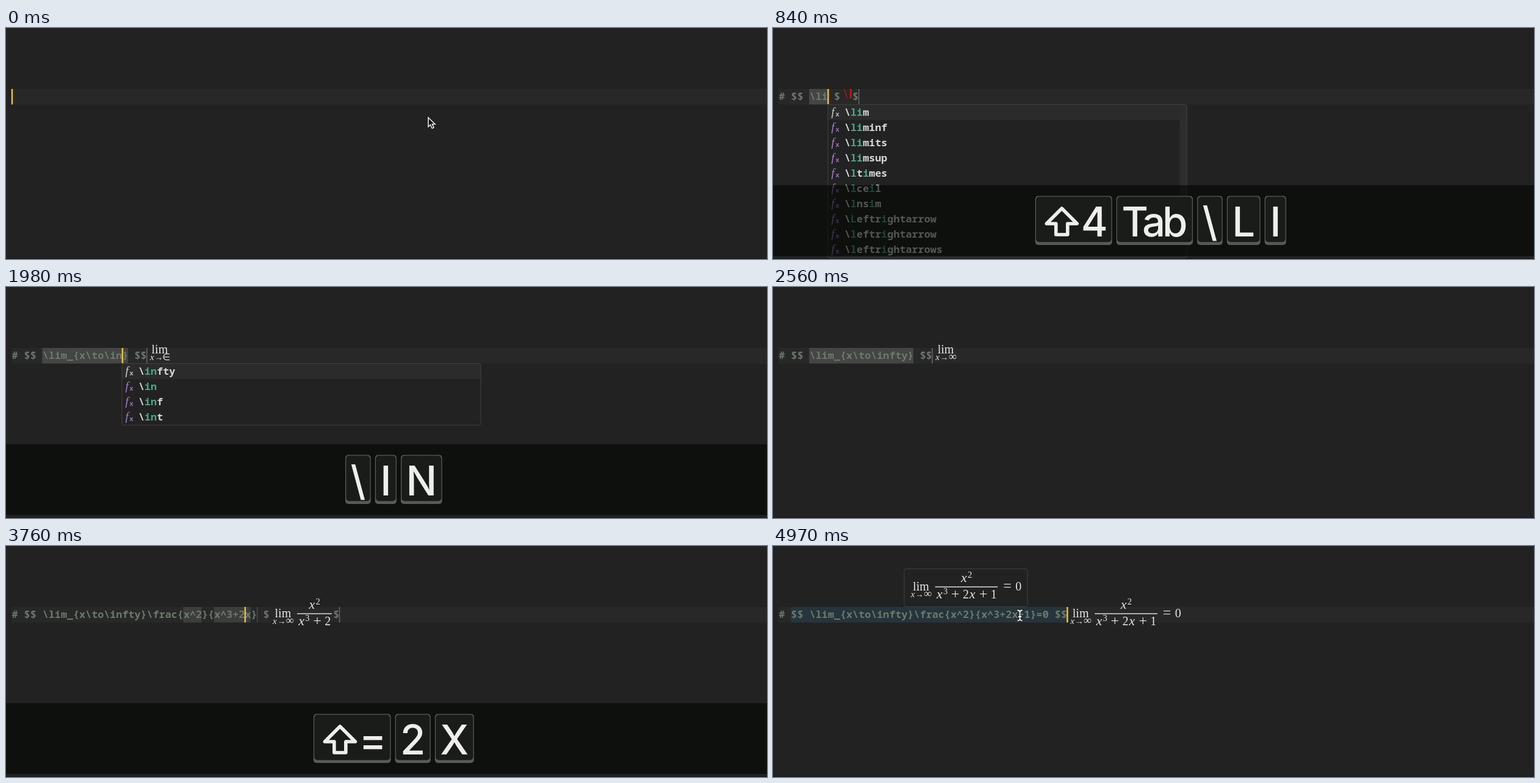
Recreate the animation shown at these times as an HTML page with a canvas. Size 1247 by 379 pixels, loop 5010 ms.

```html
<!DOCTYPE html>
<html lang="en">
<head>
<meta charset="utf-8">
<title>Typing a limit</title>
<style>
html, body { margin: 0; width: 100%; height: 100%; overflow: hidden; background: #222; }
canvas { display: block; }
</style>
</head>
<body>
<canvas id="stage" width="1247" height="379"></canvas>
<script>
const g = document.getElementById('stage').getContext('2d');
const LOOP = 5010, LEFT = 9.5, PITCH = 10.05;
const MONO = '"Noto Sans Mono", monospace';
const SERIF = '"Liberation Serif", "Times New Roman", serif';
const CODE = '700 16.75px ' + MONO;
const SNIPPET = 620, FRAC = 2950, CLICK = 4440, HOVER = 4860, MARK = 4910;
const IDLE = 220, FADE = 50;

// time, key label, inserted text, caret advance
const KEYS = [
  [150, '⇧'], [200, '⇧3', '#'], [280, 'Space', ' '],
  [400, '⇧'], [450, '⇧4', '$'], [SNIPPET, 'Tab', '$  $$', 2],
  [700, '\\', '\\'], [760, 'L', 'l'], [820, 'I', 'i'], [880, 'M', 'm'], [940, 'Tab'],
  [1260, '⇧'], [1300, '⇧-', '_'], [1350, '⇧'], [1400, '⇧[', '{}', 1], [1450, 'X', 'x'],
  [1500, '\\', '\\'], [1550, 'T', 't'], [1600, 'O', 'o'],
  [1870, '\\', '\\'], [1900, 'I', 'i'], [1930, 'N', 'n'],
  [2210, 'F', 'f'], [2270, 'Tab', 'ty', 3],
  [2660, '\\', '\\'], [2740, 'F', 'f'], [2810, 'R', 'r'], [2880, 'A', 'a'],
  [FRAC, 'Tab', 'c{}{}', 2], [3030, 'X', 'x'],
  [3100, '⇧'], [3200, '⇧6', '^'], [3260, '2', '2'], [3370, 'Tab', '', 2], [3440, 'X', 'x'],
  [3510, '⇧'], [3560, '⇧6', '^'], [3610, '3', '3'],
  [3650, '⇧'], [3680, '⇧=', '+'], [3710, '2', '2'], [3750, 'X', 'x'],
  [3860, '⇧'], [3900, '⇧=', '+'], [3960, '1', '1'], [4060, 'Tab', '', 1],
  [4140, '=', '='], [4220, '0', '0']
];

const WORDS = ('alpha beta gamma delta epsilon zeta eta cos sin cdot ' +
  'lim liminf limits limsup ltimes lceil lnsim Leftrightarrow leftrightarrow leftrightarrows ' +
  'to top tan tau times theta text infty in inf int iota iff ' +
  'frac frown forall flat fallingdotseq').split(' ');

function stateAt(t) {
  const s = { text: '', caret: 0, keys: [], last: 0, label: '' };
  for (const [at, label, ins = '', adv = ins.length] of KEYS) {
    if (at > t) break;
    s.text = s.text.slice(0, s.caret) + ins + s.text.slice(s.caret);
    s.caret += adv;
    if (label === '⇧' || at - s.last > IDLE) s.keys = [];
    if (label.length > 1 && label[0] === '⇧') s.keys.pop();
    s.keys.push(label);
    s.last = at;
    s.label = label;
  }
  return s;
}

const bodyOf = text => text.length > 7 ? text.slice(5, -3).trim() : '';

function rect(x, y, w, h, fill) {
  g.fillStyle = fill;
  g.fillRect(x, y, w, h);
}

function write(s, x, y, font, fill, align = 'left') {
  g.font = font;
  g.fillStyle = fill;
  g.textAlign = align;
  g.fillText(s, x, y);
}

// ---- formula ----
const INK = '#e6e6e6', RED = '#c01616';

function glyph(c, x, y, cell, size, style = '', fill = INK) {
  write(c, x + cell / 2, y, style + ' ' + size + 'px ' + SERIF, fill, 'center');
}

function run(s, x, y, ink = true) {
  let w = 0;
  for (let i = 0; i < s.length; i++) {
    let c = s[i], cell = 10, size = 20, up = 0, style = '';
    if (c === '^') {
      c = s[++i] || '';
      cell = 8; size = 14.5; up = 7;
    } else if (c === 'x') {
      cell = 11.4; size = 22; style = 'italic';
    } else if (c === '+') {
      cell = 24.4; size = 24;
    } else if (c === '=') {
      cell = 26.6; size = 24;
    }
    if (ink) glyph(c, x + w, y - up, cell, size, style);
    w += cell;
  }
  return w;
}

function redText(s, x, y, size) {
  const font = 'bold ' + size + 'px ' + SERIF;
  write('\\', x + size * .08, y, font, RED);
  write(s.slice(1), x + size / 2, y, font, RED);
  return size / 2 + g.measureText(s.slice(1)).width;
}

function subRun(s, x, y, ink) {
  const known = { x: ['x', 8, 15, 'italic'], '\\to': ['→', 14, 14, ''],
    '\\infty': ['∞', 13, 18, ''], '\\in': ['∈', 11, 15, ''] };
  let w = 0;
  for (const tok of s.match(/\\[a-z]*|x/g) || []) {
    const k = known[tok];
    if (!k) {
      w += ink ? redText(tok, x + w, y, 14) : 7 + 5 * (tok.length - 1);
      continue;
    }
    if (ink) glyph(k[0], x + w, y, k[1], k[2], k[3]);
    w += k[1];
  }
  return w;
}

// Draws the formula and returns its width; base is the baseline of "lim".
function formula(s, x, base) {
  if (!s.startsWith('\\lim')) return redText(s, x, base || 115, 20);
  const frac = s.match(/\\frac\{(.*?)\}\{(.*?)\}(.*)/);
  const y = base || (frac ? (frac[2] ? 117 : 113) : 109);
  const sub = (s.match(/_\{(.*?)\}/) || ['', ''])[1];
  const subW = subRun(sub, 0, 0, false);
  let w = Math.max(26.7, subW);
  write('lim', x + w / 2, y, '20px ' + SERIF, INK, 'center');
  subRun(sub, x + (w - subW) / 2, y + 11, true);
  if (frac) {
    const [, num, den, tail] = frac;
    const nw = run(num, 0, 0, false), dw = run(den, 0, 0, false);
    const bar = Math.max(nw, dw, 8) + 3;
    w += 5.6;
    rect(x + w, y - 6.6, bar, 1.4, INK);
    run(num, x + w + (bar - nw) / 2, y - (den ? 14 : 12));
    run(den, x + w + (bar - dw) / 2, y + 13);
    w += bar + 2.4;
    w += run(tail, x + w, y);
  } else {
    const rest = s.match(/\}(\\[a-z]*)$/);
    if (rest) w += 4 + redText(rest[1], x + w + 4, y, 20);
  }
  return w;
}

// ---- completion list ----
function matchAt(word, query) {
  const hits = [];
  const low = word.toLowerCase();
  let from = 0;
  for (const c of query) {
    const i = low.indexOf(c, from);
    if (i < 0) return null;
    hits.push(i);
    from = i + 1;
  }
  return query && hits[0] !== 0 ? null : hits;
}

function completions(query, x) {
  const found = WORDS.filter(w => matchAt(w, query));
  const list = found.filter(w => w.startsWith(query))
    .concat(found.filter(w => !w.startsWith(query))).slice(0, 12);
  const h = list.length * 25.05;
  rect(x, 125, 589, h + 1, '#222');
  rect(x, 126, 589, 25, '#2b2b2b');
  if (list.length > 9) rect(x + 577, 126, 12, 166, '#2d2d2d');
  g.strokeStyle = '#404040';
  g.lineWidth = 1;
  g.beginPath();
  g.roundRect(x + .5, 125.5, 588, h + 1, 3);
  g.stroke();
  list.forEach((word, row) => {
    const y = 144 + row * 25.05, hits = matchAt(word, query);
    const tint = row ? '#a97fd0' : '#d0d0d0';
    write('f', x + 6, y, 'italic 19px ' + SERIF, tint);
    write('x', x + 13, y + 1, '600 11px "Open Sans", sans-serif', tint);
    [...'\\' + word].forEach((c, i) => {
      const hit = hits.includes(i - 1);
      write(c, x + 27.5 + i * PITCH, y, (hit ? 700 : 600) + ' 16.75px ' + MONO, hit ? '#4ba78c' : '#d6d6d6');
    });
  });
}

// ---- key display ----
const KEYFONT = '450 67px Inter, sans-serif';

function keyWidth(label) {
  g.font = KEYFONT;
  const rest = label.replace('⇧', '');
  return 22 + (label[0] === '⇧' ? 65 : 0) + (rest ? g.measureText(rest).width : 0);
}

function shiftArrow(cx) {
  g.beginPath();
  [[0, 296], [25, 321], [9.5, 321], [9.5, 339], [-9.5, 339], [-9.5, 321], [-25, 321]]
    .forEach(([dx, y]) => g.lineTo(cx + dx, y));
  g.closePath();
  g.strokeStyle = '#eee';
  g.lineWidth = 5.6;
  g.lineJoin = 'round';
  g.stroke();
}

function keyBar(keys, alpha) {
  g.save();
  g.globalAlpha = alpha;
  rect(0, 258, 1247, 116, 'rgba(2,5,1,.61)');
  g.letterSpacing = '-5px';
  const widths = keys.map(keyWidth);
  let x = 635.3 - (widths.reduce((a, b) => a + b, 0) + 7 * (keys.length - 1)) / 2;
  keys.forEach((label, i) => {
    const w = widths[i], shift = label[0] === '⇧';
    const box = (y, h, fill, inset) => {
      g.fillStyle = fill;
      g.beginPath();
      g.roundRect(x + inset, y, w - 2 * inset, h, 5);
      g.fill();
    };
    box(275.5, 80.5, '#585a57', 0);
    box(276.8, 74.4, '#1a1c19', 1.3);
    if (shift) shiftArrow(x + 43.5);
    write(label.replace('⇧', ''), x + (shift ? 75 : 8.5), 342, KEYFONT, '#eee');
    x += w + 7;
  });
  g.restore();
}

// ---- pointers ----
function arrow(x, y) {
  g.beginPath();
  [[0, 0], [0, 15], [3.5, 11.8], [6.2, 17.6], [9, 16.4], [6.4, 10.8], [11, 10.8]]
    .forEach(([dx, dy]) => g.lineTo(x + dx, y + dy));
  g.closePath();
  g.fillStyle = '#111';
  g.fill();
  g.strokeStyle = '#f2f2f2';
  g.lineWidth = 1.5;
  g.lineJoin = 'miter';
  g.stroke();
}

function beam(x, y) {
  g.beginPath();
  for (const s of [-1, 1]) {
    g.moveTo(x - 4, y + 8.5 * s);
    g.quadraticCurveTo(x, y + 8.5 * s, x, y + 5 * s);
    g.quadraticCurveTo(x, y + 8.5 * s, x + 4, y + 8.5 * s);
  }
  g.moveTo(x, y - 6);
  g.lineTo(x, y + 6);
  g.moveTo(x - 2.5, y + 2);
  g.lineTo(x + 2.5, y + 2);
  g.lineJoin = 'round';
  for (const [c, w] of [['#222', 4], ['#f2f2f2', 1.8]]) {
    g.strokeStyle = c;
    g.lineWidth = w;
    g.stroke();
  }
}

function draw(t) {
  const s = stateAt(t), old = stateAt(t - 45), clicked = t >= CLICK;
  const { text } = s, end = text.length;
  g.textBaseline = 'alphabetic';
  rect(0, 0, 1247, 379, '#222');
  rect(0, 378, 1247, 1, '#171717');
  rect(9, 100, 1238, 25.5, '#282828');

  // The rendered formula trails the typed text a little.
  const body = bodyOf(old.text), spot = old.text.length;
  const spotX = LEFT + PITCH * spot;
  const gap = body ? 4.8 + formula(body, spotX + 4.8) : 0;
  const xOf = col => LEFT + PITCH * col + (col > spot ? gap : 0);
  const span = (a, b, fill) => rect(xOf(a) - .5, 100, Math.max(xOf(b) - xOf(a), 1.5), 25.5, fill);

  if (t >= SNIPPET && !clicked) {
    if (t >= FRAC) {
      const m = text.match(/\\frac\{(.*?)\}\{(.*?)\}/);
      const a = m.index + 6, b = a + m[1].length + 2, c = b + m[2].length;
      span(a, a + m[1].length, '#3d3e3c');
      span(b, c, '#3d3e3c');
      span(c + 1, c + 1, '#484a47');
    } else {
      span(5, end - 3, '#444544');
    }
    span(end, end, '#686868');
  }
  if (t >= MARK) span(2, end, '#26343c');

  write(text.slice(0, spot), LEFT, 118, CODE, '#6c796c');
  if (spot < end) write(text.slice(spot), spotX + gap, 118, CODE, '#6c796c');

  const since = t - (clicked ? CLICK : s.last);
  if (Math.floor(since / 250) % 2 === 0) {
    const col = clicked ? end : stateAt(t - 15).caret;
    rect(xOf(col) - .8, 100, 2.5, 25.5, '#ecc040');
  }

  const word = s.label !== 'Tab' && text.slice(0, s.caret).match(/\\([a-z]*)$/);
  if (word) completions(word[1], Math.round(xOf(s.caret - Math.max(0, word[1].length - 2))) - .5);

  const idle = t - s.last;
  if (s.keys.length && idle < IDLE + FADE) {
    keyBar(s.keys, Math.min(1, (IDLE + FADE - idle) / FADE));
  }

  if (t >= HOVER) {
    g.beginPath();
    g.roundRect(215, 37.5, 202, 62, 3);
    g.fillStyle = '#222';
    g.fill();
    g.strokeStyle = '#404040';
    g.lineWidth = 1;
    g.stroke();
    formula(body, 225, 73);
  }
  if (t < KEYS[0][0]) arrow(692, 147);
  if (clicked) {
    const p = Math.min(1, (t - CLICK) / 280), e = p * p * (3 - 2 * p);
    beam(484 - 79.5 * e, 113 + e);
  }
}

const start = performance.now();
function tick() {
  draw((performance.now() - start) % LOOP);
  requestAnimationFrame(tick);
}
tick();
</script>
</body>
</html>
```
